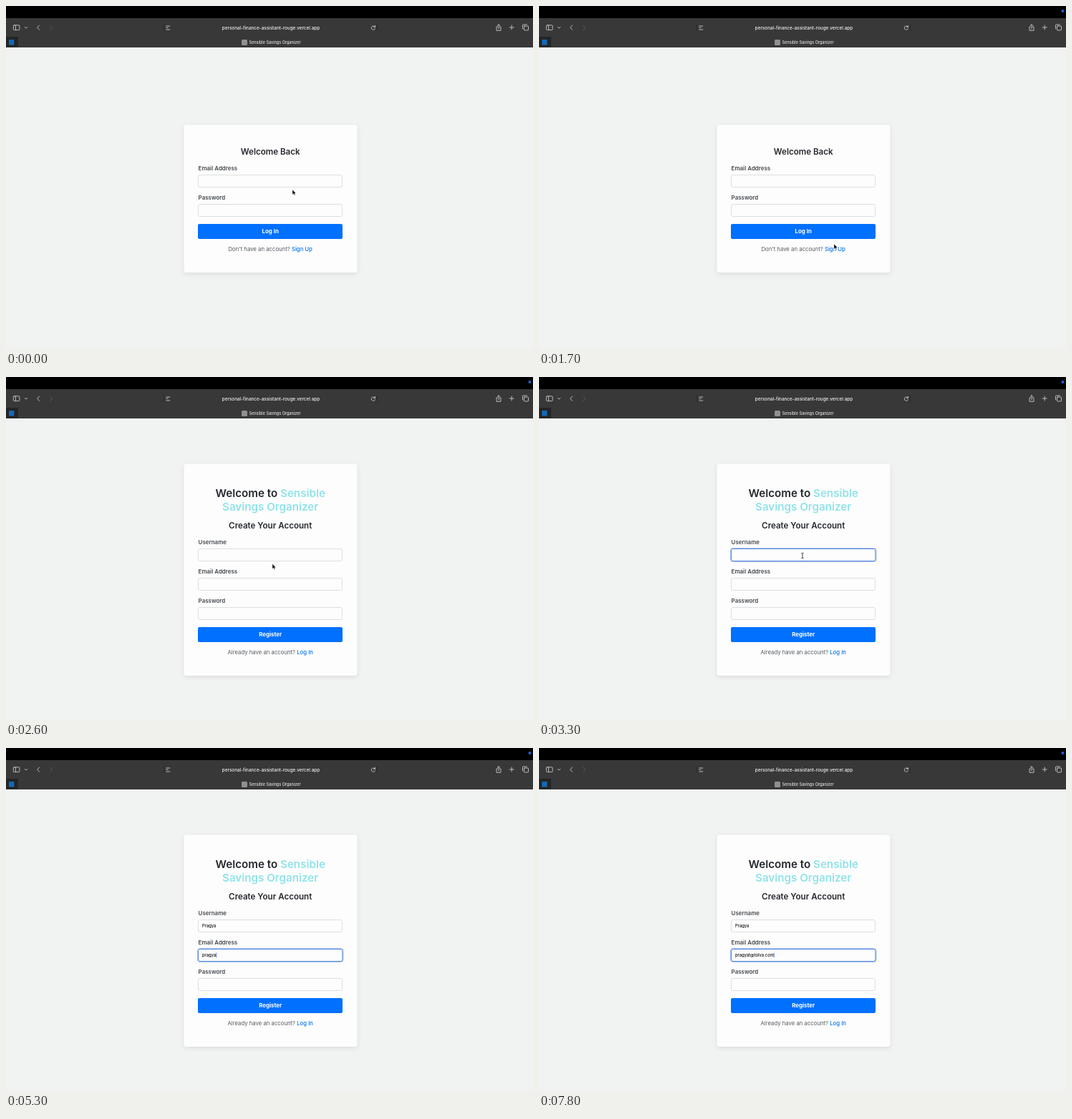
These frames come from a looping animation (736 by 480 pixels, 8000 ms). An HTML page:

```html
<!DOCTYPE html>
<html lang="en">
<head>
<meta charset="utf-8">
<title>Sign-up walkthrough</title>
<style>
  html, body { margin: 0; width: 100%; height: 100%; overflow: hidden; background: #f1f3f3; }
  svg { display: block; width: 736px; height: 480px; }
  text { font-family: Inter, Roboto, sans-serif; fill: #25292e; }
  .mid { text-anchor: middle; }
  .title { font-size: 15.2px; font-weight: 600; }
  .brand { fill: #90e3e8; }
  .sub { font-size: 11.6px; font-weight: 600; }
  .label { font-size: 7.95px; font-weight: 600; fill: #44494e; }
  .cta { font-size: 7.9px; font-weight: 700; fill: #fff; }
  .foot { font-size: 7.75px; fill: #555b61; }
  .link { fill: #0a74f0; font-weight: 500; }
  .typed { font-size: 5.75px; font-weight: 500; fill: #111; }
  .url { font-size: 6.35px; font-weight: 500; fill: #f2f2f2; }
  .tab { font-size: 5.5px; font-weight: 500; fill: #e2e2e2; }
  .card { fill: #fdfdfd; filter: drop-shadow(0 2px 3px rgba(0, 0, 0, .09)); }
  .box { fill: #fdfdfd; stroke: #dcdee0; }
  .icon { fill: none; stroke: #c9c9c9; stroke-width: .9; stroke-linecap: round; stroke-linejoin: round; }
  .dim { stroke: #5c5c5c; }
</style>
</head>
<body>
<svg viewBox="0 0 736 480">
  <rect width="736" height="480" fill="#f1f3f3"/>
  <rect width="736" height="58" fill="#383838"/>
  <rect width="736" height="17" fill="#000"/>
  <circle id="dot" cx="731.5" cy="7" r="2" fill="#2563d8"/>

  <path d="M220.5 26v9M518.5 26v9" stroke="#282828" stroke-width=".8"/>
  <text class="url mid" x="370" y="32.7">personal-finance-assistant-rouge.vercel.app</text>
  <g class="icon">
    <rect x="10.3" y="26.8" width="8.6" height="6.8" rx="1.2"/>
    <path d="M13.4 27v6.4M26.3 29.4l1.7 1.7 1.7-1.7M46.6 27l-3 3.2 3 3.2"/>
    <path class="dim" d="M61.6 27l3 3.2-3 3.2"/>
    <path d="M223.8 28h5M223.8 30.2h2.4M223.8 33h5"/>
    <path d="M515.3 29.2a2.7 2.7 0 1 0 .2 2.4M515.5 27.4v2h-2"/>
    <path d="M686.4 29h-1.4v5.3h6V29h-1.4M688 32v-6M686.4 27.3l1.6-1.6 1.6 1.6"/>
    <path d="M703.2 30h6M706.2 27v6"/>
    <rect x="723.5" y="28" width="6" height="6" rx="1"/>
    <path d="M721.5 32v-5q0-1 1-1h5"/>
  </g>

  <rect y="43" width="17" height="14.5" fill="#242526"/>
  <rect x="4" y="47" width="7.4" height="7.4" rx="1" fill="#1668b5"/>
  <rect x="329" y="47" width="8" height="8" rx="1.5" fill="#909090"/>
  <text class="tab" x="339.5" y="53">Sensible Savings Organizer</text>

  <g id="login"></g>
  <g id="register"></g>

  <g id="focus" fill="none">
    <rect x="267.5" y="-9.5" width="203.5" height="19" rx="3" stroke="#a9c3f1"/>
    <rect x="268.5" y="-8.5" width="201.5" height="17" rx="2.4" stroke="#5787db"/>
  </g>
  <rect id="mark" x="273" y="245.6" width="20" height="6.6" fill="#c9dcf7"/>
  <text id="name" class="typed" x="274" y="251"></text>
  <text id="mail" class="typed" x="274" y="292"></text>
  <rect id="caret" width=".8" height="6.6" fill="#2463e8"/>
  <g id="hint">
    <rect x="270" y="253.5" width="39" height="11.2" rx="4" fill="#1c1c1e"/>
    <text x="274" y="261.2" style="font-size:6.2px;fill:#f4f4f4">Pragya</text>
    <path d="M301.4 257.6l2.8 2.8m0-2.8l-2.8 2.8" stroke="#bbb" stroke-width=".7"/>
  </g>

  <g id="status">
    <path d="M0 470h174q3 0 3 3v7H0z" fill="#383838"/>
    <text class="tab" x="4" y="477.2">Go to “personal-finance-assistant-rouge.vercel.app/register”</text>
  </g>

  <path id="arrow" d="M0 0v7l1.6-1.4 1.1 2.3 1.1-.5-1-2.2h2.1z" fill="#000" stroke="#fff" stroke-width=".4"/>
  <path id="beam" d="M-1.6-3.6Q0-3.6 0-2.6Q0-3.6 1.6-3.6M0-2.6v5.2M-1.6 3.6Q0 3.6 0 2.6Q0 3.6 1.6 3.6" fill="none" stroke="#111" stroke-width=".8"/>
</svg>
<script>
const $ = id => document.getElementById(id);
const LOOP = 8000, STEP = 100;
const NAME_Y = 249, MAIL_Y = 290;
const PAGE_AT = 2200, NAME_AT = 2900, HINT_AT = 4000, MAIL_AT = 4300;

const card = (y, h) => `<rect class="card" x="248.5" y="${y}" width="242" height="${h}" rx="4"/>`;
const mid = (cls, y, text) => `<text class="mid ${cls}" x="369.2" y="${y}">${text}</text>`;
const field = (label, y) => `<text class="label" x="268.6" y="${y - 14.7}">${label}</text>
  <rect class="box" x="268.5" y="${y - 8.5}" width="201" height="17" rx="2.4"/>`;
const button = (label, y) => `<rect x="268" y="${y - 10.5}" width="202" height="21" rx="2" fill="#0070ff"/>`
  + mid('cta', y + 2.8, label);
const foot = (y, text, link) => mid('foot', y, `${text} <tspan class="link">${link}</tspan>`);

$('login').innerHTML = card(166.3, 206.7) + mid('sub', 208, 'Welcome Back')
  + field('Email Address', 245) + field('Password', 286)
  + button('Log In', 315.5) + foot(343.4, "Don't have an account?", 'Sign Up');

$('register').innerHTML = card(121.5, 296.5)
  + mid('title', 167.6, 'Welcome to <tspan class="brand">Sensible</tspan>')
  + mid('title brand', 187, 'Savings Organizer')
  + mid('sub', 212.2, 'Create Your Account')
  + field('Username', NAME_Y) + field('Email Address', MAIL_Y) + field('Password', 331)
  + button('Register', 360.5) + foot(388.4, 'Already have an account?', 'Log In');

// [time, x, y]
const path = [
  [100, 400, 257], [500, 409, 300], [900, 414, 331], [1700, 412, 333], [1800, 413, 337],
  [2200, 413, 337], [2600, 372, 261.5], [2800, 368, 250], [3900, 368, 250], [4100, 352, 291]
];
// time of each key press
const nameKeys = [3500, 3600, 3700, 3800, 3900, 4000];
const mailKeys = [4700, 4800, 4900, 5000, 5100, 5200, 5600, 6000, 6300, 6400,
  6900, 7100, 7400, 7600, 7700, 7700, 7800];

const show = (id, on) => $(id).style.display = on ? '' : 'none';
const typed = (keys, t) => keys.filter(k => k <= t).length;

function pointer(t) {
  if (t <= path[0][0]) return path[0].slice(1);
  const i = path.findIndex(p => p[0] > t);
  if (i < 0) return path[path.length - 1].slice(1);
  const [t0, x0, y0] = path[i - 1], [t1, x1, y1] = path[i];
  const k = (t - t0) / (t1 - t0);
  return [x0 + (x1 - x0) * k, y0 + (y1 - y0) * k];
}

function draw(t) {
  const onRegister = t >= PAGE_AT, onMail = t >= MAIL_AT, onName = t >= NAME_AT && !onMail;
  show('dot', t >= 100);
  show('login', !onRegister);
  show('register', onRegister);

  // link address fades in while the pointer rests on the link
  show('status', t >= 1800 && !onRegister);
  $('status').style.opacity = Math.min(1, (t - 1700) / 300);

  $('name').textContent = onMail ? 'Pragya' : 'pragya'.slice(0, typed(nameKeys, t));
  $('mail').textContent = 'pragyat@tolva.com'.slice(0, typed(mailKeys, t));
  const hinting = onName && t >= HINT_AT;
  show('mark', hinting);
  show('hint', hinting);

  const focusY = onMail ? MAIL_Y : NAME_Y;
  show('focus', onName || onMail);
  $('focus').setAttribute('transform', `translate(0 ${focusY})`);

  const input = $(onMail ? 'mail' : 'name');
  const keys = onMail ? [MAIL_AT, ...mailKeys] : [NAME_AT, ...nameKeys];
  const idle = t - Math.max(...keys.filter(k => k <= t));
  show('caret', (onName || onMail) && idle % 1000 < 400);
  const width = input.textContent ? input.getComputedTextLength() : 0;
  $('caret').setAttribute('x', 274 + width);
  $('caret').setAttribute('y', focusY - 3.4);

  const hidden = (t >= nameKeys[0] && t < 3900) || t >= mailKeys[0];
  const overField = t >= 2800;
  const place = `translate(${pointer(t).join(' ')})`;
  for (const id of ['arrow', 'beam']) {
    $(id).setAttribute('transform', place);
    show(id, !hidden && overField === (id === 'beam'));
  }
}

const start = performance.now();
function tick() {
  const t = (performance.now() - start) % LOOP;
  draw(Math.floor(t / STEP) * STEP);
  requestAnimationFrame(tick);
}
tick();
</script>
</body>
</html>
```
